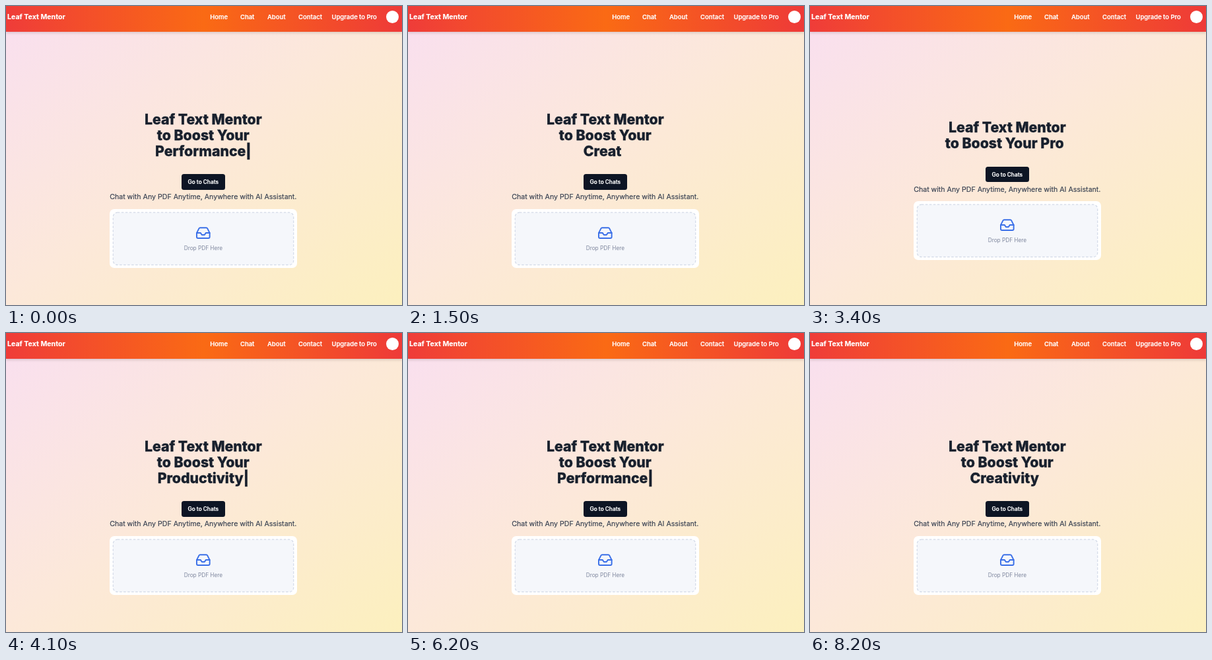
Recreate the animation shown at these times as an HTML page. Size 600 px wide and 452 px high, loop 8300 ms.

```html
<!DOCTYPE html>
<html lang="en">
<head>
<meta charset="utf-8">
<title>Leaf Text Mentor</title>
<style>
  html, body { margin: 0; width: 100%; height: 100%; overflow: hidden; }
  body {
    position: relative;
    font-family: Inter, sans-serif;
    font-optical-sizing: none;
    -webkit-text-stroke: .18px;
    white-space: nowrap;
    background: linear-gradient(to bottom right, #f9dff0, #fce8da 48%, #fcf0be);
  }
  nav {
    position: absolute; inset: 0 0 auto; height: 39px;
    background: linear-gradient(to right, #ef3c39, #fa6a14 50%, #ee3a38);
    box-shadow: 0 2px 4px #0002;
    color: #fff; font: 600 9.44px/33px Inter, sans-serif;
  }
  nav * { position: absolute; top: 0; }
  nav b { left: 2px; font-size: 10.62px; font-weight: 700; }
  nav i { left: 576px; top: 6.5px; width: 19px; height: 19px; border-radius: 50%; background: #fff; }
  main {
    position: absolute; left: 156.8px; top: 0; width: 284px; height: 556.4px;
    display: flex; flex-direction: column; align-items: center; justify-content: center;
  }
  h1 {
    margin: 0; white-space: pre; text-align: center; color: #18202d;
    font-size: 21.24px; font-weight: 800; line-height: 23.6px;
    -webkit-text-stroke: .35px;
  }
  .button {
    margin-top: 23.4px; width: 66px; height: 23.6px; border-radius: 3.5px;
    background: #0d1524; color: #fff; text-align: center;
    font-size: 8.26px; font-weight: 600; line-height: 24.8px;
  }
  p { margin: 3.3px 0 8.7px; color: #3a4353; font-size: 10.62px; line-height: 16.5px; }
  .card { width: 284px; height: 89.5px; border-radius: 7px; background: #fff; }
  .card svg { display: block; }
</style>
</head>
<body>
<nav>
  <b>Leaf Text Mentor</b>
  <span style="left:309.3px">Home</span>
  <span style="left:355px">Chat</span>
  <span style="left:396px">About</span>
  <span style="left:443px">Contact</span>
  <span style="left:493.5px">Upgrade to Pro</span>
  <i></i>
</nav>
<main>
  <h1><span id="title"></span><span id="cursor">|</span></h1>
  <div class="button">Go to Chats</div>
  <p>Chat with Any PDF Anytime, Anywhere with AI Assistant.</p>
  <div class="card">
    <svg width="284" height="89.5">
      <rect x="5.3" y="5.2" width="273.4" height="79.2" rx="6.5" fill="#f5f7fb"
        stroke="#d3dae7" stroke-width="1.2" stroke-dasharray="3.6 2.4"/>
      <g transform="translate(130 24.3) scale(.983)" fill="none" stroke="#3b70e8"
        stroke-width="2" stroke-linecap="round" stroke-linejoin="round">
        <path d="M22 12h-6l-2 3h-4l-2-3H2"/>
        <path d="M5.45 5.11 2 12v6a2 2 0 0 0 2 2h16a2 2 0 0 0 2-2v-6l-3.45-6.89A2 2 0 0 0 16.76 4H7.24a2 2 0 0 0-1.79 1.11z"/>
      </g>
      <text x="141.9" y="61.5" text-anchor="middle" font-size="8.26" fill="#7f879e">Drop PDF Here</text>
    </svg>
  </div>
</main>
<script>
  const LOOP = 8300, KEY_MS = 50, BLINK = 1100;
  const title = document.getElementById('title');
  const cursor = document.getElementById('cursor');

  // wrap: letters at which the word no longer fits beside "to Boost Your"
  const words = [
    { text: 'Performance', type: -1000, erase: 725, end: 1250, kept: 0, wrap: 4 },
    { text: 'Creativity', type: 1275, erase: 2775, end: 3250, kept: 0, wrap: 3 },
    { text: 'Productivity', type: 3275, erase: 4975, end: 5500, kept: 0, wrap: 4 },
    { text: 'Performance', type: 5525, erase: 7025, end: 7550, kept: 1, wrap: 4 },
    { text: 'Creativity', type: 7575, erase: LOOP, end: LOOP, kept: 0, wrap: 3 },
  ];

  const keys = (t, start) => Math.max(0, Math.ceil((t - start) / KEY_MS));

  function draw(t) {
    const { text, type, erase, kept, wrap } = words.find(w => t < w.end);
    const typed = Math.min(text.length, kept + keys(t, type));
    const count = Math.max(0, typed - keys(t, erase));
    const gap = count >= wrap ? '\n' : ' ';
    title.textContent = 'Leaf Text Mentor\nto Boost Your' + gap + text.slice(0, count);
    cursor.style.opacity = (t - 75 + BLINK) % BLINK < BLINK / 2 ? 0 : 1;
  }

  const start = performance.now();
  function tick() {
    draw((performance.now() - start) % LOOP);
    requestAnimationFrame(tick);
  }
  tick();
</script>
</body>
</html>
```
